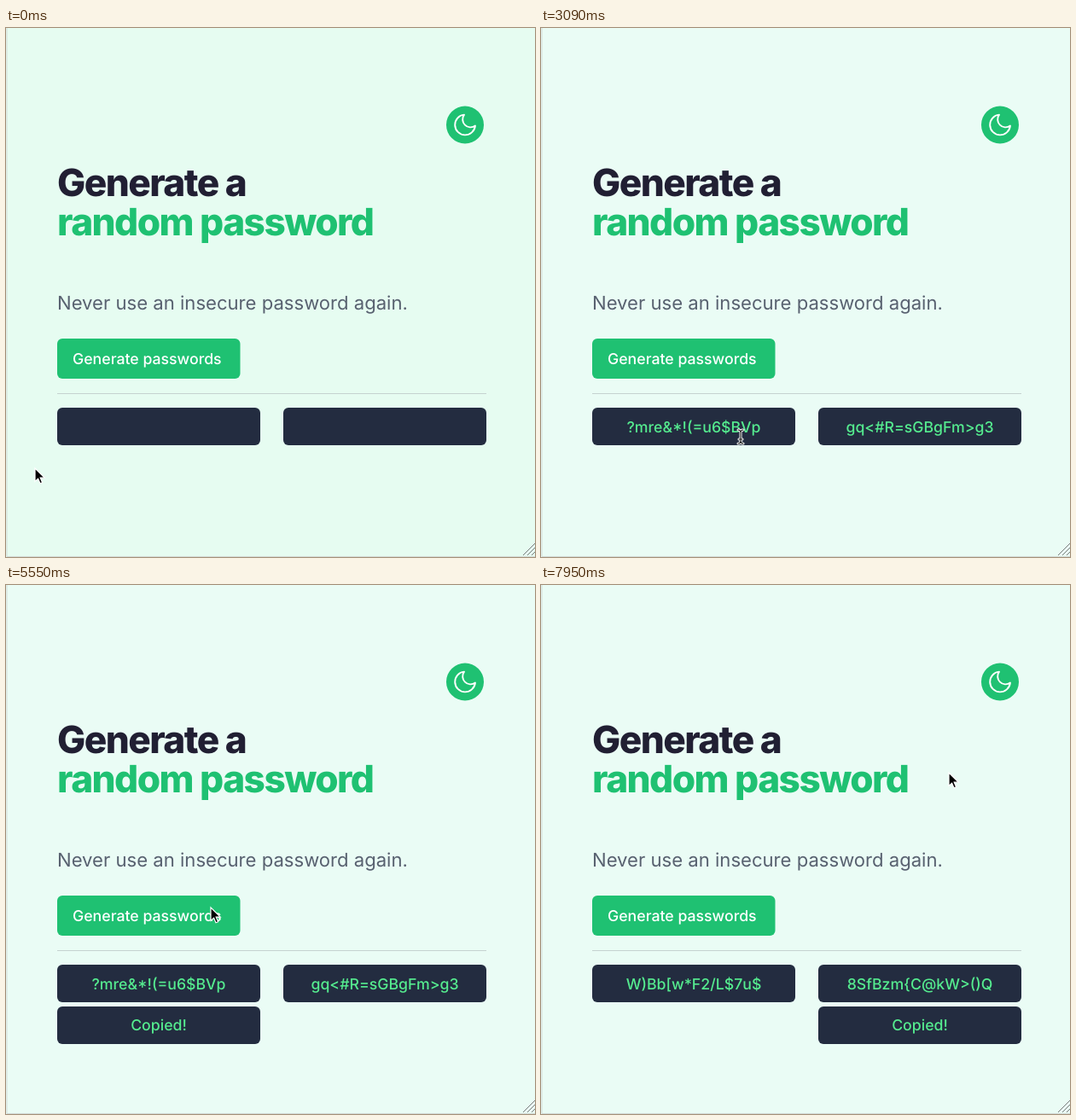
Recreate the animation shown at these times as an HTML page. Size 620 px wide and 620 px high, loop 8 s.

```html
<!DOCTYPE html>
<html lang="en">
<head>
<meta charset="utf-8">
<title>Password generator</title>
<style>
  html, body { margin: 0; width: 100%; height: 100%; overflow: hidden; }
  svg {
    display: block; width: 100vw; height: 100vh;
    font-family: Inter, sans-serif; font-optical-sizing: none; text-rendering: geometricPrecision;
  }
  .title { font-size: 44.2px; font-weight: 800; letter-spacing: -0.035em; }
  .lead { font-size: 22.1px; fill: #586170; }
  .button { font-size: 17.7px; font-weight: 500; fill: #fff; }
  .code { font-size: 17.7px; font-weight: 500; fill: #55ec8f; text-anchor: middle; }
  .panel { fill: #232c40; }
  .green { fill: #1fc172; }
</style>
</head>
<body>
<svg viewBox="0 0 620 620">
  <defs>
    <g id="box">
      <rect class="panel" width="238" height="44" rx="6"/>
    </g>
    <path id="caret" d="M-3-8Q0-8 0-5Q0-8 3-8M0-5V5M-3 8Q0 8 0 5Q0 8 3 8M-2 3H2"/>
  </defs>

  <rect id="page" width="620" height="620"/>
  <path d="M1 0V619.5H620" fill="none" stroke="#d3dcd8"/>
  <path d="M606 618L620 604M611 618L620 609M616 618L620 614" stroke="#747b78"/>

  <circle class="green" cx="538" cy="113.5" r="22"/>
  <path d="M21 12.79A9 9 0 1 1 11.21 3 7 7 0 0 0 21 12.79z" transform="translate(522.2 97.7) scale(1.32)"
        fill="none" stroke="#fff" stroke-width="1.45" stroke-linejoin="round"/>

  <text class="title" x="60" y="197" fill="#211f33">Generate a</text>
  <text class="title green" x="60" y="243">random password</text>
  <text class="lead" x="60" y="330">Never use an insecure password again.</text>

  <rect class="green" x="60" y="364" width="214.5" height="47" rx="6"/>
  <text class="button" x="78" y="394">Generate passwords</text>
  <path d="M60 428.5H563" stroke="#c5d2d0"/>

  <use href="#box" x="60" y="445"/>
  <use href="#box" x="325" y="445"/>
  <text class="code" id="left" x="179" y="474"></text>
  <text class="code" id="right" x="444" y="474"></text>

  <g id="copied">
    <use href="#box" y="494"/>
    <text class="code" x="119" y="522">Copied!</text>
  </g>

  <path id="arrow" d="M0 0V15.5L3.6 12.2L6 17.8L8.6 16.7L6.2 11.2H11.2Z" stroke="#fff" stroke-width="1.2"/>
  <g id="beam" fill="none" stroke-linecap="round">
    <use href="#caret" stroke="#fff" stroke-width="3"/>
    <use href="#caret" stroke="#111" stroke-width="1.1"/>
  </g>
</svg>
<script>
  const LOOP = 8000;
  const $ = id => document.getElementById(id);

  // Pointer stops: time, x, y
  const stops = [
    [0, 34, 516], [700, 34, 516], [1270, 61, 409], [1900, 150, 386], [3090, 234, 479],
    [4410, 268, 470], [5550, 240, 378], [6410, 335, 434], [7000, 434, 470], [7950, 478, 220]
  ];

  // Each click on the button, followed by a click on one password
  const rounds = [
    { at: 1950, left: "?mre&*!(=u6$BVp", right: "gq<#R=sGBgFm>g3", copyAt: 3600, noticeX: 60 },
    { at: 5720, left: "W)Bb[w*F2/L$7u$", right: "8SfBzm{C@kW>()Q", copyAt: 7050, noticeX: 325 }
  ];

  const smooth = k => k * k * (3 - 2 * k);
  const show = (id, visible) => { $(id).style.display = visible ? "" : "none"; };
  const move = (id, x, y) => $(id).setAttribute("transform", `translate(${x} ${y})`);

  function pointerAt(t) {
    const next = stops.findIndex(stop => stop[0] > t);
    if (next < 0) return stops.at(-1).slice(1);
    const [t0, x0, y0] = stops[next - 1], [t1, x1, y1] = stops[next];
    const k = smooth((t - t0) / (t1 - t0));
    return [x0 + (x1 - x0) * k, y0 + (y1 - y0) * k];
  }

  const overText = (x, y) => Math.abs(y - 468) < 14 &&
    (Math.abs(x - 179) < 79 || Math.abs(x - 444) < 87);

  function draw(t) {
    const round = rounds.findLast(r => r.at <= t);
    $("left").textContent = round?.left ?? "";
    $("right").textContent = round?.right ?? "";
    $("page").setAttribute("fill", round ? "#eafcf5" : "#e6fcf1");

    show("copied", round && t >= round.copyAt);
    if (round) move("copied", round.noticeX, 0);

    const [x, y] = pointerAt(t), beam = round && overText(x, y);
    show("beam", beam);
    show("arrow", !beam);
    move("beam", x, y);
    move("arrow", x, y);
  }

  const start = performance.now();
  function tick() {
    draw((performance.now() - start) % LOOP);
    requestAnimationFrame(tick);
  }
  tick();
</script>
</body>
</html>
```
